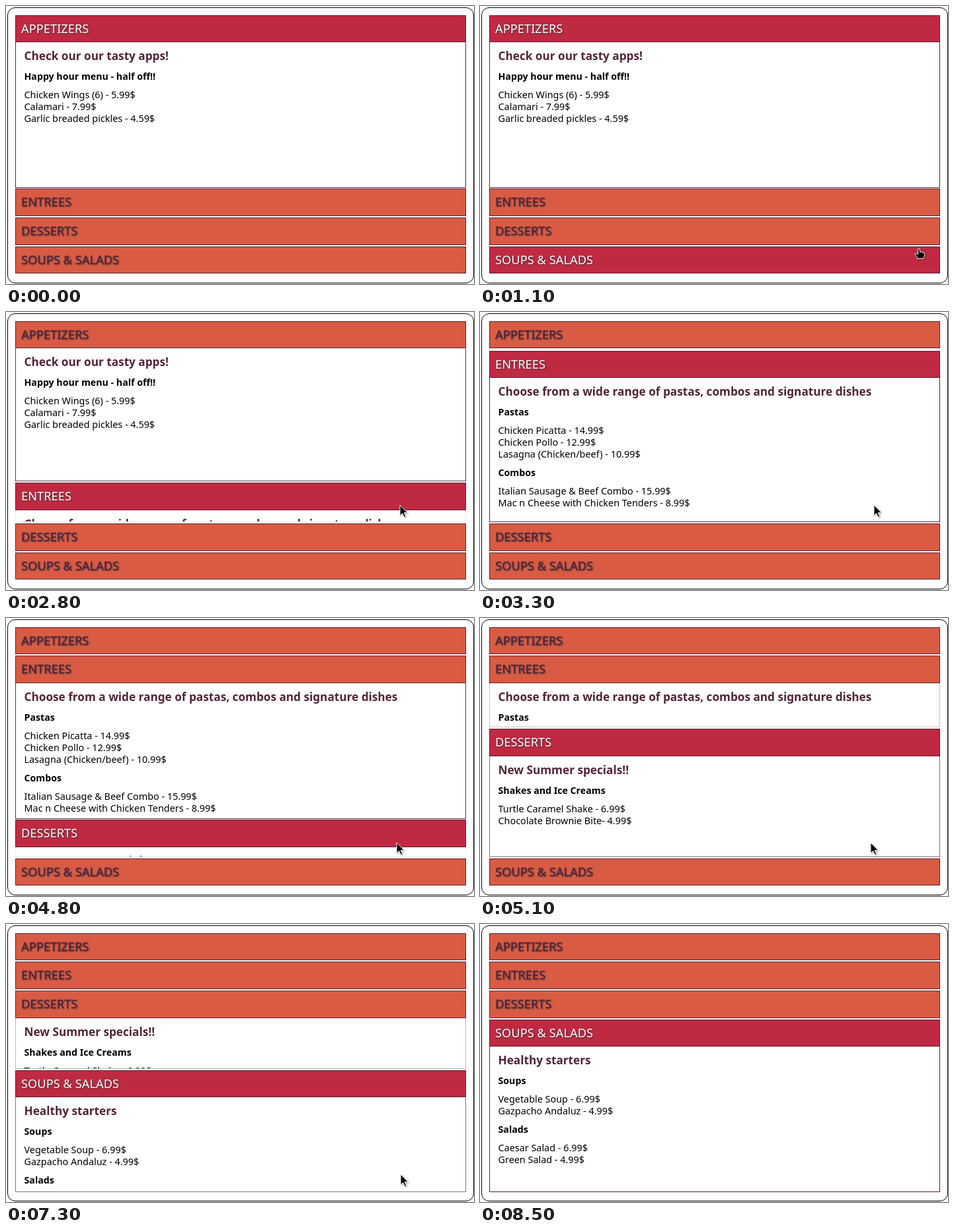
An HTML page for the animation above (9.7 s loop, 708x422 px).

```html
<!DOCTYPE html>
<html lang="en">
<head>
<meta charset="utf-8">
<title>Menu accordion</title>
<style>
  html, body { margin: 0; width: 100%; height: 100%; overflow: hidden; background: #fff; }
  body { position: relative; font: 14.4px/20px "Noto Sans", sans-serif; color: #000; white-space: nowrap; }
  .frame, .head, .panel, .panel div, svg { position: absolute; box-sizing: border-box; }
  .frame { left: 2px; top: 2px; width: 706px; height: 419px; border: 1px solid #000; border-radius: 12px; }
  .head, .panel { left: 14px; width: 682px; overflow: hidden; }
  .head {
    border: 1px solid #542437; padding-left: 8px; font-size: 18.3px; line-height: 38px;
    background: #d95b43; color: #542437; text-shadow: 1px 1px 2px #444; -webkit-text-stroke: .4px;
  }
  .head.on { background: #c02942; color: #fff; text-shadow: 1px 1px 2px #333; -webkit-text-stroke: 0; }
  .panel { border: solid; border-width: 0 1px 1px; background: #fff; }
  .panel div { left: 12.5px; }
  .panel .title { font-size: 17.2px; font-weight: bold; color: #542437; }
  .panel .group { font-size: 14.2px; font-weight: bold; }
  svg { left: 0; top: 0; overflow: visible; fill: #000; stroke: #fff; stroke-linejoin: round; filter: drop-shadow(1px 1px 1px #0006); }
</style>
</head>
<body>
<div class="frame"></div>
<script>
const LOOP = 9700, STEP = 100, SLIDE = 650;
const TOP = 13.8, PITCH = 43.65, HEAD = 41.5, OPEN = 220;

// Each section: header, title, then groups of [name, ...items]
const sections = [
  ['APPETIZERS', 'Check our our tasty apps!',
    ['Happy hour menu - half off!!', 'Chicken Wings (6) - 5.99$', 'Calamari - 7.99$', 'Garlic breaded pickles - 4.59$']],
  ['ENTREES', 'Choose from a wide range of pastas, combos and signature dishes',
    ['Pastas', 'Chicken Picatta - 14.99$', 'Chicken Pollo - 12.99$', 'Lasagna (Chicken/beef) - 10.99$'],
    ['Combos', 'Italian Sausage & Beef Combo - 15.99$', 'Mac n Cheese with Chicken Tenders - 8.99$']],
  ['DESSERTS', 'New Summer specials!!',
    ['Shakes and Ice Creams', 'Turtle Caramel Shake - 6.99$', 'Chocolate Brownie Bite- 4.99$']],
  ['SOUPS & SALADS', 'Healthy starters',
    ['Soups', 'Vegetable Soup - 6.99$', 'Gazpacho Andaluz - 4.99$'],
    ['Salads', 'Caesar Salad - 6.99$', 'Green Salad - 4.99$']]
];
const clicks = [{ at: 2600, start: 2679 }, { at: 4800, start: 4692 }, { at: 7000, start: 6912 }];
const pointer = [ // time, x, y
  [700, 715, 428], [1600, 596, 293], [3300, 596, 293], [3500, 594, 313], [3900, 591, 341],
  [6000, 591, 341], [6500, 597, 380], [8300, 597, 380], [8400, 617, 392]
];
const ARROW = 'M0 0V16L3.7 12.6L6.4 18.5L8.8 17.4L6.2 11.7H11.3Z';
const HAND = 'M.6 .8Q2-.8 3.4 .8V5.5L5 5Q6 5 6.4 6L8 5.8Q8.8 6 9 7Q10.6 7 10.6 8.6V11L9 13.5V15.5H-.5V13.5L-4 9.2Q-4.4 7.2-2.4 7.4L.6 9.2Z';

function add(parent, className, text = '') {
  const el = document.createElement('div');
  el.className = className;
  el.textContent = text;
  return parent.appendChild(el);
}

const views = sections.map(([name, title, ...groups]) => {
  const panel = add(document.body, 'panel');
  const line = (kind, text, middle) => add(panel, kind, text).style.top = Math.round(middle - 10.5) + 'px';
  line('title', title, 21.5);
  let y = 52;
  for (const [group, ...items] of groups) {
    line('group', group, y);
    items.forEach((item, i) => line('item', item, y + 28 + i * 18.3));
    y += 56 + (items.length - 1) * 18.3;
  }
  return { head: add(document.body, 'head', name), panel };
});

document.body.insertAdjacentHTML('beforeend', '<svg width="1" height="1"><path/></svg>');
const cursor = document.querySelector('svg'), shape = cursor.firstChild;

function slide({ at, start }, t) {
  if (t < at) return 0;
  return 0.5 - Math.cos(Math.PI * Math.min(1, (t - start) / SLIDE)) / 2;
}

function pointerAt(t) {
  if (t < 800 || t >= 8500) return null;
  const i = pointer.findIndex(key => key[0] >= t);
  const [t0, x0, y0] = pointer[i - 1], [t1, x1, y1] = pointer[i];
  const k = (t - t0) / (t1 - t0);
  return { x: Math.round(x0 + (x1 - x0) * k), y: Math.round(y0 + (y1 - y0) * k) };
}

function place(el, top, bottom) {
  el.style.top = Math.round(top) + 'px';
  el.style.height = Math.round(bottom) - Math.round(top) + 'px';
}

function draw(t) {
  const shown = [1, ...clicks.map(c => slide(c, t)), 0];
  const active = clicks.filter(c => t >= c.at).length;
  const at = pointerAt(t);
  let top = TOP, hovering = false;

  views.forEach(({ head, panel }, i) => {
    const open = shown[i] - shown[i + 1], bottom = top + HEAD;
    const hover = at && i !== active && at.x < 696 && at.y >= top && at.y < bottom;
    hovering ||= hover;
    head.classList.toggle('on', i === active || !!hover);
    place(head, top, bottom);
    place(panel, bottom, bottom + (OPEN + 0.5) * open);
    panel.style.display = open > 0.002 ? '' : 'none';
    panel.style.borderColor = `rgba(84, 36, 55, ${open})`;
    top += PITCH + OPEN * open;
  });

  cursor.style.display = at ? '' : 'none';
  if (at) {
    cursor.style.transform = `translate(${at.x}px, ${at.y}px)`;
    shape.setAttribute('d', hovering ? HAND : ARROW);
  }
}

function tick() {
  draw(Math.floor(performance.now() % LOOP / STEP) * STEP);
  requestAnimationFrame(tick);
}
tick();
</script>
</body>
</html>
```
